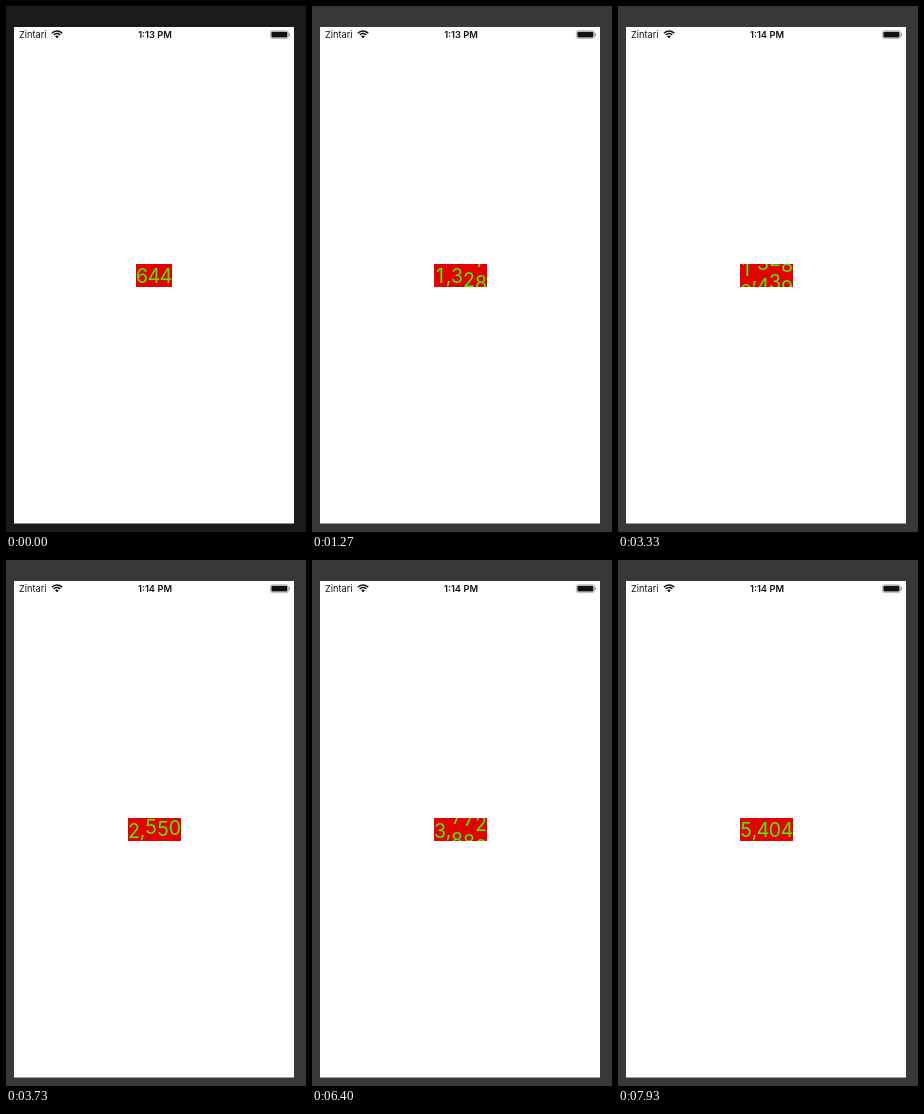
An HTML page with a canvas that plays this animation: 300x526 px, repeating every 8 s.

```html
<!DOCTYPE html>
<html lang="en">
<head>
<meta charset="utf-8">
<title>Rolling counter</title>
<style>
  html, body { margin: 0; width: 100%; height: 100%; overflow: hidden; }
  canvas { display: block; width: 300px; height: 526px; }
</style>
</head>
<body>
<canvas id="stage"></canvas>
<script>
const LOOP = 8000, ROW = 23, DIGIT = 12, COMMA = 5;
const TOP = 258, BOTTOM = 281, MIDDLE = 270;
const rolls = [
  { start: 122, from: '0644', to: '1328' },
  { start: 3012, from: '1328', to: '2672' },
  { start: 6071, from: '2672', to: '5404' }
];

const canvas = document.getElementById('stage');
const ctx = canvas.getContext('2d');
const scale = window.devicePixelRatio || 1;
canvas.width = 300 * scale;
canvas.height = 526 * scale;

const ease = x => (1 - Math.cos(Math.PI * Math.min(1, Math.max(0, x)))) / 2;
// Columns further left finish sooner.
const progress = (elapsed, column) => ease(elapsed / (860 + 135 * column));

function rect(x, y, w, h, color) {
  ctx.fillStyle = color;
  ctx.fillRect(x, y, w, h);
}

function label(text, x, y, font, align) {
  ctx.font = font + ' Inter, Roboto, sans-serif';
  ctx.textAlign = align;
  ctx.fillText(text, x, y);
}

function glyph(char, x, shift) {
  label(char, x, MIDDLE + 7 + shift, '400 19.5px', 'center');
}

function rollingDigit(from, to, p, x) {
  const pos = from + (to - from + 10) % 10 * p;
  const base = Math.floor(pos);
  for (const n of [base, base + 1]) glyph(String(n % 10), x, (n - pos) * ROW);
}

function statusBar(time) {
  ctx.fillStyle = '#111';
  label('Zintari', 13, 32, '400 9.2px', 'left');
  label(time, 149, 32, '600 9.3px', 'center');

  // Wi-Fi
  ctx.strokeStyle = '#111';
  ctx.lineWidth = 1.5;
  for (const r of [7, 4.4]) {
    ctx.beginPath();
    ctx.arc(51, 32, r, -Math.PI * 0.76, -Math.PI * 0.24);
    ctx.stroke();
  }
  ctx.beginPath();
  ctx.moveTo(51, 32.3);
  ctx.arc(51, 32.3, 2.6, -Math.PI * 0.76, -Math.PI * 0.24);
  ctx.fill();

  // Battery
  ctx.strokeStyle = '#888';
  ctx.lineWidth = 0.6;
  ctx.beginPath();
  ctx.roundRect(264.4, 24.8, 18, 7.8, 2);
  ctx.stroke();
  ctx.beginPath();
  ctx.roundRect(265.4, 25.8, 16, 5.8, 1);
  ctx.fill();
  rect(283.1, 27.5, 0.9, 2.4, '#777');
}

function counter(t) {
  const roll = rolls.filter(r => t >= r.start).pop();
  const left = roll ? 122 : 130;
  const width = roll ? 53 : 36;
  rect(left, TOP, width, BOTTOM - TOP, '#e80000');

  ctx.save();
  ctx.beginPath();
  ctx.rect(left, TOP, width, BOTTOM - TOP);
  ctx.clip();
  ctx.fillStyle = '#48ee08';
  if (!roll) {
    [...'644'].forEach((d, i) => glyph(d, left + DIGIT * (i + 0.5), 0));
  } else {
    const elapsed = t - roll.start;
    for (let i = 0; i < 4; i++) {
      const x = left + DIGIT * (i + 0.5) + (i ? COMMA : 0);
      const p = progress(elapsed, i ? i + 1 : 0);
      rollingDigit(+roll.from[i], +roll.to[i], p, x);
    }
    const hidden = roll === rolls[0] ? 1 - progress(elapsed, 1) : 0;
    glyph(',', left + DIGIT + COMMA / 2, hidden * ROW);
  }
  ctx.restore();
}

function draw(now) {
  const t = now % LOOP;
  ctx.setTransform(scale, 0, 0, scale, 0, 0);
  rect(0, 0, 300, 526, t < 1140 ? '#1a1a1a' : '#383838');
  rect(8, 21, 280, 496.5, '#fff');
  statusBar(t < 3060 ? '1:13 PM' : '1:14 PM');
  counter(t);
}

const begin = performance.now();
function tick() {
  draw(performance.now() - begin);
  requestAnimationFrame(tick);
}
tick();
</script>
</body>
</html>
```
